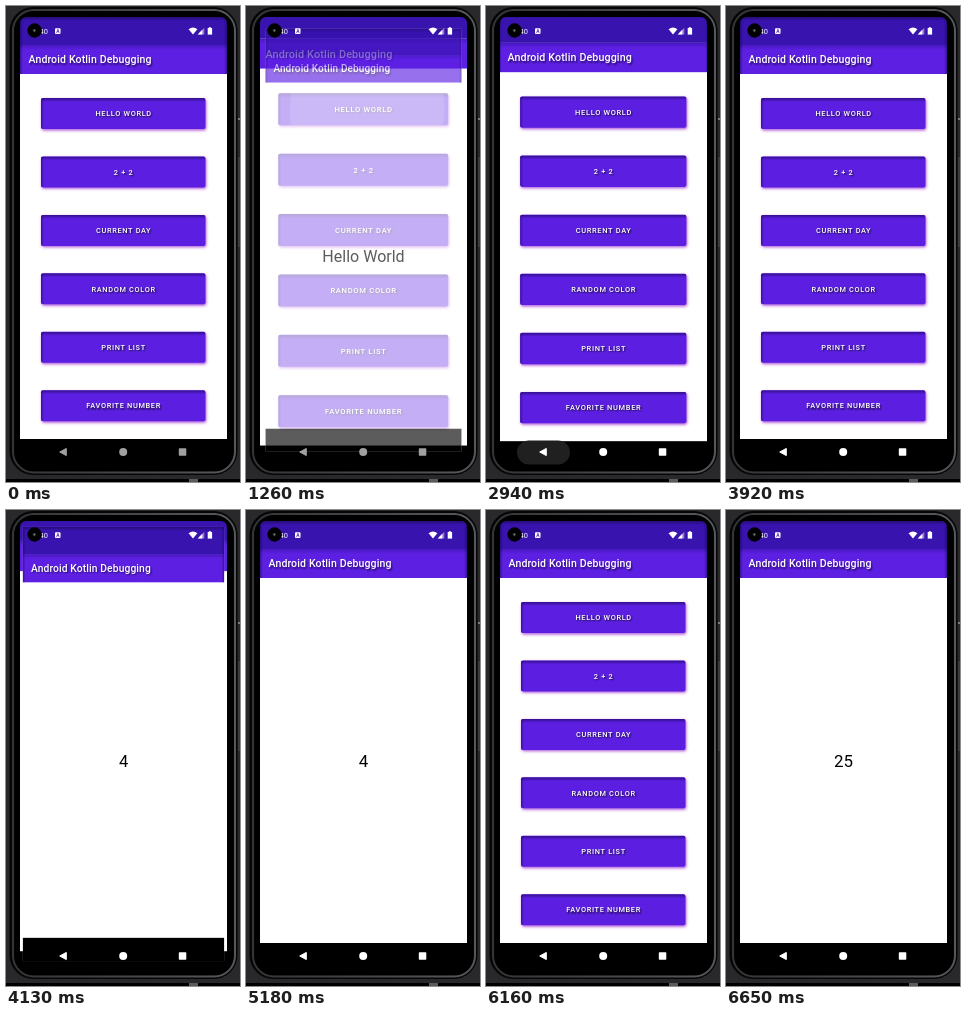
An HTML page with a canvas for the animation above (8 s loop, 234x476 px).

```html
<!DOCTYPE html>
<html lang="en">
<head>
<meta charset="utf-8">
<title>Debugging demo</title>
<style>
  html, body { margin: 0; width: 100%; height: 100%; overflow: hidden; background: #29292c; }
  canvas { display: block; width: 234px; height: 476px; }
</style>
</head>
<body>
<canvas id="stage"></canvas>
<script>
const W = 234, H = 476, LOOP = 8000, STEP = 70;
const SCREEN = { x: 14, y: 11, w: 207, h: 446 };
const CENTER = { x: 117.5, y: 234 };
const FONT = 'Roboto, "Noto Sans", sans-serif';
const LABELS = ['HELLO WORLD', '2 + 2', 'CURRENT DAY', 'RANDOM COLOR', 'PRINT LIST', 'FAVORITE NUMBER'];

// press: finger down; at: start of the window transition
const VISITS = [
  { button: 0, text: 'Hello World', press: 1050, at: 1178, back: 2730, close: 2838, released: 3150 },
  { button: 1, text: '4', press: 3920, at: 4015, back: 5320, close: 5530, released: 5880 },
  { button: 5, text: '25', press: 6160, at: 6250, back: Infinity, close: Infinity, released: Infinity }
];

const ratio = window.devicePixelRatio || 1;
const makeContext = canvas => {
  canvas.width = Math.round(W * ratio);
  canvas.height = Math.round(H * ratio);
  return canvas.getContext('2d');
};
const stage = makeContext(document.getElementById('stage'));
const layer = makeContext(document.createElement('canvas'));

const clamp = v => Math.max(0, Math.min(1, v));
const mix = (a, b, p) => a + (b - a) * p;
const cubic = (a, b, c, d, t) => {
  const u = 1 - t;
  return a * u * u * u + 3 * b * u * u * t + 3 * c * u * t * t + d * t * t * t;
};

// Two-piece curve: quick start, very long settle
function ease(x) {
  if (x <= 0) return 0;
  if (x >= 1) return 1;
  const [xs, ys] = x < 1 / 6
    ? [[0, 0.05, 0.13333, 1 / 6], [0, 0, 0.06, 0.4]]
    : [[1 / 6, 0.20833, 0.25, 1], [0.4, 0.82, 1, 1]];
  let lo = 0, hi = 1;
  for (let i = 0; i < 24; i++) {
    const mid = (lo + hi) / 2;
    if (cubic(...xs, mid) < x) lo = mid; else hi = mid;
  }
  return cubic(...ys, lo);
}

function rounded(c, x, y, w, h, r) {
  c.beginPath();
  c.roundRect(x, y, w, h, r);
}

function shadow(c, color, blur, dx, dy) {
  c.shadowColor = color;
  c.shadowBlur = blur * ratio;
  c.shadowOffsetX = dx * ratio;
  c.shadowOffsetY = dy * ratio;
}

// Fills a box with a colour that fades out along (dx, dy) from (x0, y0)
function shade(c, rgb, alpha, [x0, y0, dx, dy], box) {
  const g = c.createLinearGradient(x0, y0, x0 + dx, y0 + dy);
  g.addColorStop(0, `rgba(${rgb},${alpha})`);
  g.addColorStop(1, `rgba(${rgb},0)`);
  c.fillStyle = g;
  c.fillRect(...box);
}

function label(c, text, x, y, size, { weight = 400, align = 'center', color = '#fff', spacing = 0 } = {}) {
  c.font = `${weight} ${size}px ${FONT}`;
  c.letterSpacing = spacing + 'px';
  c.textAlign = align;
  c.textBaseline = 'alphabetic';
  c.fillStyle = color;
  c.fillText(text, x, y);
  c.letterSpacing = '0px';
}

function bars(c) {
  const { x, y, w, h } = SCREEN;
  c.fillStyle = '#fff';
  c.fillRect(x, y, w, h);
  c.fillStyle = '#5d20e3';
  c.fillRect(x, 39, w, 29);
  shade(c, '40,10,140', 0.5, [0, 38, 0, 6], [x, 39, w, 5]);
  c.fillStyle = '#3813ae';
  c.fillRect(x, y, w, 28);
  shade(c, '20,5,70', 0.5, [0, y, 0, 4], [x, y, w, 4]);
  shade(c, '20,5,70', 0.5, [x, 0, 3, 0], [x, y, 3, 57]);
  shade(c, '20,5,70', 0.5, [x + w, 0, -3, 0], [x + w - 3, y, 3, 57]);
  c.fillStyle = '#000';
  c.fillRect(x, 433, w, y + h - 433);
  c.save();
  shadow(c, 'rgba(20,0,70,.75)', 2, 1.2, 1.2);
  label(c, 'Android Kotlin Debugging', 22.5, 57.3, 10.54, { weight: 500, align: 'left', spacing: 0.13 });
  c.restore();
}

function button(c, text, i) {
  const x = 35, y = 92 + i * 58.45, w = 164.5, h = 31;
  c.save();
  shadow(c, 'rgba(150,35,205,.75)', 3, 0.8, 1.4);
  c.fillStyle = '#5c1fe2';
  rounded(c, x, y, w, h, 2);
  c.fill();
  c.restore();
  c.save();
  rounded(c, x, y, w, h, 2);
  c.clip();
  shade(c, '35,8,110', 0.75, [0, y, 0, 4], [x, y, w, 4]);
  shade(c, '35,8,110', 0.6, [x, 0, 3, 0], [x, y, 3, h]);
  c.restore();
  c.save();
  shadow(c, 'rgba(0,0,0,.75)', 1.8, 1.2, 1.2);
  label(c, text, 117.6, y + 18.2, 7.38, { weight: 500, spacing: 0.66 });
  c.restore();
}

function ripple(c, i, age) {
  const y = 92 + i * 58.45;
  c.save();
  rounded(c, 35, y, 164.5, 31, 2);
  c.clip();
  c.fillStyle = `rgba(255,255,255,${0.12 * clamp(age / 100)})`;
  c.beginPath();
  c.arc(121, y + 15, mix(20, 75, clamp(age / 210)), 0, 7);
  c.fill();
  c.restore();
}

function menu(c, visit, t) {
  bars(c);
  LABELS.forEach((text, i) => button(c, text, i));
  if (visit && t > visit.press && t < visit.back) ripple(c, visit.button, t - visit.press);
}

function result(c, text) {
  bars(c);
  label(c, text, 117.5, 257.2, 16.9, { color: '#000' });
}

// Paints a whole window apart, so that its opacity applies to it as one
function showWindow(scale, alpha, paint) {
  if (alpha <= 0) return;
  layer.setTransform(ratio, 0, 0, ratio, 0, 0);
  layer.clearRect(0, 0, W, H);
  layer.translate(CENTER.x, CENTER.y);
  layer.scale(scale, scale);
  layer.translate(-CENTER.x, -CENTER.y);
  layer.save();
  layer.beginPath();
  layer.rect(SCREEN.x, SCREEN.y, SCREEN.w, SCREEN.h);
  layer.clip();
  paint(layer);
  layer.restore();
  stage.globalAlpha = alpha;
  stage.drawImage(layer.canvas, 0, 0, W, H);
  stage.globalAlpha = 1;
}

function device() {
  stage.fillStyle = '#29292c';
  stage.fillRect(0, 0, W, H);
  stage.fillStyle = '#3b3b3e';
  stage.fillRect(232, 151, 2, 90);
  stage.fillStyle = '#77777a';
  stage.fillRect(232, 112, 2, 2);
  rounded(stage, 3.5, 1, 228, 468, 24);
  stage.fillStyle = '#050506';
  stage.fill();
  const metal = stage.createLinearGradient(0, 0, W, 0);
  metal.addColorStop(0, '#343437');
  metal.addColorStop(1, '#56585c');
  rounded(stage, 7, 4, 222, 462.5, 21);
  stage.lineWidth = 2;
  stage.strokeStyle = metal;
  stage.stroke();
  rounded(stage, 8.5, 5.5, 219, 459.5, 19);
  stage.fillStyle = '#000';
  stage.fill();
  stage.fillRect(0, 473, W, 3);
  stage.fillStyle = '#5c5c5f';
  stage.fillRect(183, 473, 9, 3);
}

function statusIcons() {
  label(stage, '40', 33.6, 28, 7.4, { align: 'left' });
  stage.fillStyle = '#000';
  stage.beginPath();
  stage.arc(28.6, 24.5, 7.2, 0, 7);
  stage.fill();
  stage.fillStyle = '#2d3a36';
  stage.beginPath();
  stage.arc(28.3, 24.5, 1.7, 0, 7);
  stage.fill();
  stage.fillStyle = '#8b9993';
  stage.fillRect(28, 24, 1, 1);

  stage.fillStyle = '#fff';
  rounded(stage, 49, 22.2, 5.5, 5.8, 1);
  stage.fill();
  label(stage, 'A', 51.75, 27, 4.8, { weight: 700, color: '#3813ae' });

  stage.fillStyle = '#fff';
  stage.beginPath();
  stage.moveTo(187, 28.6);
  stage.lineTo(182.6, 23.2);
  stage.quadraticCurveTo(187, 20, 191.4, 23.2);
  stage.fill();
  stage.beginPath();
  stage.moveTo(198.3, 21.8);
  stage.lineTo(198.3, 28.4);
  stage.lineTo(191.7, 28.4);
  stage.closePath();
  stage.globalAlpha = 0.45;
  stage.fill();
  stage.globalAlpha = 1;
  stage.beginPath();
  stage.moveTo(196.3, 23.8);
  stage.lineTo(196.3, 28.4);
  stage.lineTo(191.7, 28.4);
  stage.fill();
  stage.fillRect(201.7, 22, 4.4, 6.6);
  stage.fillRect(202.9, 21.2, 2, 1);
}

function navIcons(t, visit) {
  if (visit && t >= visit.back && t < visit.released) {
    const shown = clamp((t - visit.back + 50) / 140) * clamp((visit.released - t) / 140);
    stage.globalAlpha = shown;
    stage.fillStyle = '#202020';
    rounded(stage, 31, 434.5, 53, 24, 12);
    stage.fill();
    stage.globalAlpha = 1;
  }
  stage.fillStyle = stage.strokeStyle = t < VISITS[0].back ? '#a0a0a0' : '#fff';
  stage.lineJoin = 'round';
  stage.lineWidth = 1;
  stage.beginPath();
  stage.moveTo(53.7, 446);
  stage.lineTo(60.3, 442.4);
  stage.lineTo(60.3, 449.6);
  stage.closePath();
  stage.fill();
  stage.stroke();
  stage.beginPath();
  stage.arc(117.2, 446, 4, 0, 7);
  stage.fill();
  rounded(stage, 172.8, 442.3, 7.5, 7.5, 0.7);
  stage.fill();
}

function draw(t) {
  stage.setTransform(ratio, 0, 0, ratio, 0, 0);
  device();
  const visit = VISITS.filter(v => t >= v.press).pop();
  const closing = visit && t >= visit.close;
  const age = visit ? t - (closing ? visit.close : visit.at) : 0;
  const p = ease(age / 400);
  const fade = clamp((age - 50) / 50);

  stage.save();
  rounded(stage, SCREEN.x, SCREEN.y, SCREEN.w, SCREEN.h, 6);
  stage.clip();
  const menuScale = closing ? mix(1.05, 1, p) : mix(1, 1.05, p);
  showWindow(menuScale, 1, c => menu(c, visit, t));
  if (visit) {
    const scale = closing ? mix(1, 0.9, p) : mix(0.85, 1, p);
    showWindow(scale, closing ? 1 - fade : fade, c => result(c, visit.text));
  }
  stage.restore();
  statusIcons();
  navIcons(t, visit);
}

const began = performance.now();
function tick() {
  const t = (performance.now() - began) % LOOP;
  draw(Math.floor(t / STEP) * STEP);
  requestAnimationFrame(tick);
}
tick();
</script>
</body>
</html>
```
